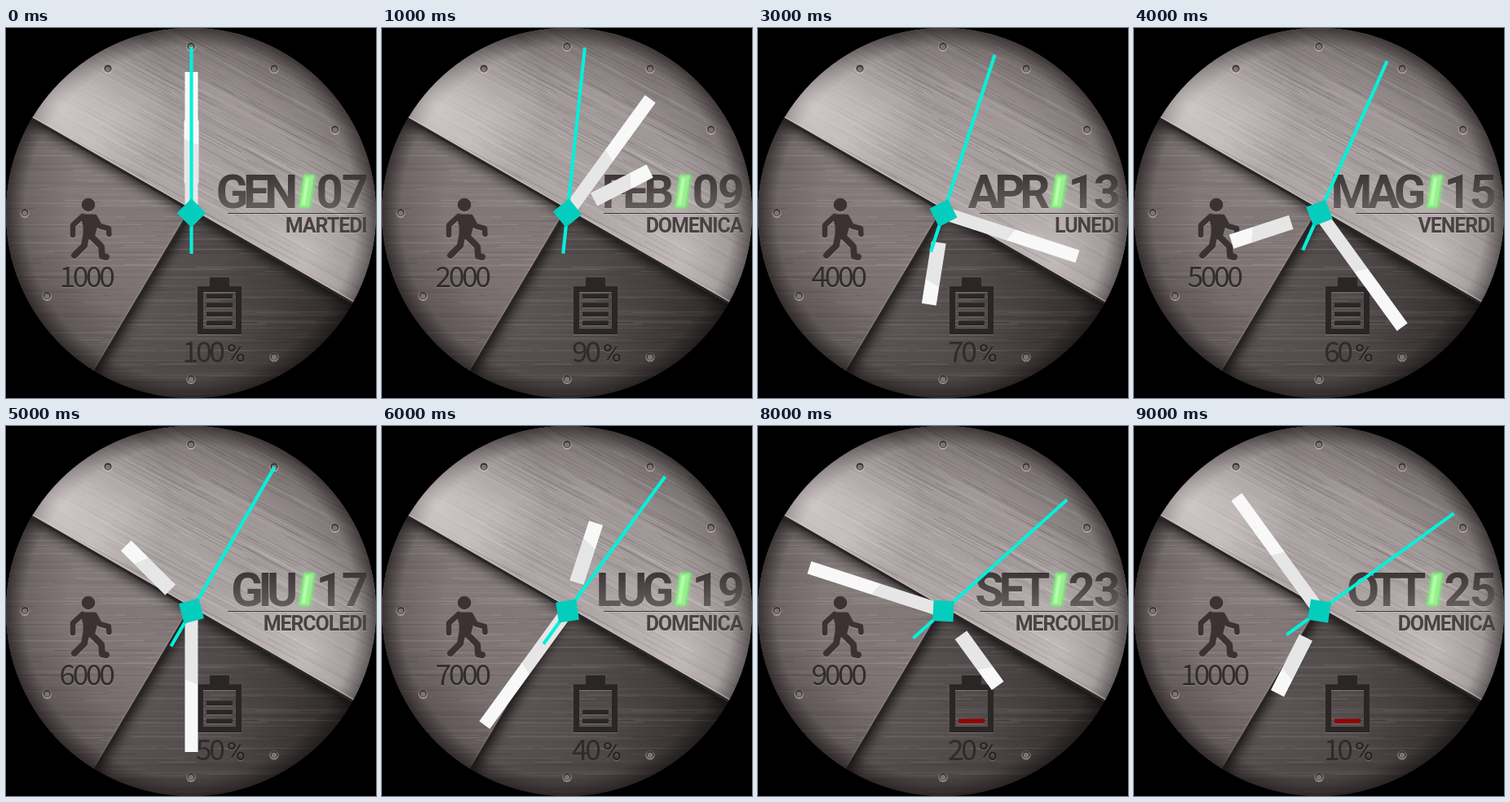
Recreate the animation shown at these times as an HTML page with a canvas. Size 454 by 454 pixels, loop 10000 ms.

```html
<!DOCTYPE html>
<html lang="it">
<head>
<meta charset="utf-8">
<title>Watch face</title>
<style>
  html, body { margin: 0; width: 100%; height: 100%; overflow: hidden; background: #000; }
  canvas, svg { position: absolute; left: 0; top: 0; width: 454px; height: 454px; }
  .date { font: 700 58px Roboto, "Liberation Sans", sans-serif; }
  .day { font: 700 25px Roboto, "Liberation Sans", sans-serif; letter-spacing: -1.1px; }
  .count { font: 300 35.5px "Noto Sans CJK JP", "Noto Sans CJK SC", "Open Sans", sans-serif; letter-spacing: -3.4px; }
  .percent { font: 500 32px Roboto, "Open Sans", sans-serif; }
  .engraved { filter: drop-shadow(0 1px .5px rgba(255, 255, 255, .2)); }
</style>
</head>
<body>
<canvas id="metal" width="454" height="454"></canvas>
<svg viewBox="0 0 454 454">
  <defs>
    <linearGradient id="ink" x1="0" y1="180" x2="0" y2="222" gradientUnits="userSpaceOnUse">
      <stop offset="0" stop-color="#3d3636"/><stop offset="1" stop-color="#665d5d"/>
    </linearGradient>
    <linearGradient id="sheen" x1="0" y1="-80" x2="5" y2="-92" gradientUnits="userSpaceOnUse">
      <stop offset=".48" stop-color="#e7e6e7"/><stop offset=".52" stop-color="#f8f8f8"/>
    </linearGradient>
    <filter id="glow" x="-60%" y="-30%" width="220%" height="160%"><feGaussianBlur stdDeviation="2"/></filter>
  </defs>

  <g class="engraved">
    <g class="date" fill="url(#ink)">
      <text id="month" y="221.3" text-anchor="end" x="352" letter-spacing="-6.3"/>
      <text id="date" y="221.3" text-anchor="end" x="443" letter-spacing="-2"/>
    </g>
    <path d="M272 227.5H438" stroke="#3e3636"/>
    <text id="day" class="day" x="442.5" y="251" text-anchor="end" fill="#4a4242"/>
  </g>
  <path d="M365 180H380L374 221H359Z" fill="#7cf27a" opacity=".75" filter="url(#glow)"/>
  <path d="M366 181H378L372 220H360Z" fill="#98f08f" stroke="#82e57e" stroke-width="1.5" stroke-linejoin="round"/>
  <path d="M370 184L365 217" stroke="#b5ffab" stroke-width="4"/>

  <g class="engraved" fill="#3b3333" stroke="#3b3333" stroke-linecap="round" stroke-linejoin="round">
    <circle cx="101" cy="217" r="8.3" stroke="none"/>
    <path d="M94 231H107L110 242L106 257H97L97 243Z" stroke-width="5"/>
    <path fill="none" stroke-width="6.5" d="M94 231L82 242L82 254M109 232L115 243L126 246L126.5 253"/>
    <path fill="none" stroke-width="8" d="M98 256L96 267L84 279M106 257L117 268L118 280L123 281"/>
  </g>
  <text id="steps" class="count engraved" x="98" y="318" text-anchor="middle" fill="#332c2c"/>

  <path d="M235 317H250V306H274V317H289V376H235ZM242 324V369H282V324Z" fill="#2b2626" fill-rule="evenodd" class="engraved"/>
  <g id="bars" class="engraved"></g>
  <text id="charge" class="count" x="265.5" y="410" text-anchor="end" fill="#302a2a"/>
  <text class="percent engraved" x="270.5" y="410" fill="#2b2525">%</text>

  <g transform="translate(227.5 227)">
    <path id="hour" d="M-9 -36.5H9V-113.5H-9Z" fill="url(#sheen)"/>
    <path id="minute" d="M-8 -10H8V-173H-8Z" fill="url(#sheen)"/>
    <g id="second">
      <path d="M0 50V-204" stroke="#05f0da" stroke-width="4.2"/>
      <path d="M0 -17.8L17.8 0L0 17.8L-17.8 0Z" fill="#05cdbd"/>
    </g>
  </g>
</svg>
<script>
const months = ['GEN', 'FEB', 'MAR', 'APR', 'MAG', 'GIU', 'LUG', 'AGO', 'SET', 'OTT'];
const days = ['MARTEDI', 'DOMENICA', 'MERCOLEDI', 'LUNEDI', 'VENERDI',
  'MERCOLEDI', 'DOMENICA', 'VENERDI', 'MERCOLEDI', 'DOMENICA'];
const byId = id => document.getElementById(id);

const ctx = byId('metal').getContext('2d');
const upperPlate = [[0, 0], [454, 0], [454, 354], [0, 93]];
let seed = 17;
function random() {
  seed = (seed * 16807) % 2147483647;
  return seed / 2147483647;
}

function trace(points) {
  ctx.beginPath();
  points.forEach(([x, y]) => ctx.lineTo(x, y));
}

function gradient(x1, y1, x2, y2, colors) {
  const g = ctx.createLinearGradient(x1, y1, x2, y2);
  colors.forEach((c, i) => g.addColorStop(i / (colors.length - 1), c));
  return g;
}

// A brushed plate casting a shadow on the plates beneath it
function plate(points, fill, degrees, strength) {
  ctx.save();
  trace(points);
  ctx.shadowColor = 'rgba(0,0,0,.85)';
  ctx.shadowBlur = 16;
  ctx.shadowOffsetX = 2;
  ctx.shadowOffsetY = 6;
  ctx.fillStyle = fill;
  ctx.fill();
  ctx.shadowColor = 'transparent';
  ctx.clip();
  ctx.translate(227, 227);
  ctx.rotate(degrees * Math.PI / 180);
  for (let i = 0; i < 1100; i++) {
    const tone = random() < .5 ? 255 : 20;
    ctx.fillStyle = `rgba(${tone},${tone},${tone},${random() * strength})`;
    ctx.fillRect(random() * 600 - 350, random() * 500 - 250, 30 + random() * 180, 1);
  }
  ctx.restore();
}

function line(x1, y1, x2, y2, color, width) {
  ctx.strokeStyle = color;
  ctx.lineWidth = width;
  trace([[x1, y1], [x2, y2]]);
  ctx.stroke();
}

function light(x, y, radius, rgb, alpha) {
  const g = ctx.createRadialGradient(x, y, 0, x, y, radius);
  g.addColorStop(0, `rgba(${rgb},${alpha})`);
  g.addColorStop(1, `rgba(${rgb},0)`);
  ctx.fillStyle = g;
  ctx.fillRect(0, 0, 454, 454);
}

function hole(degrees) {
  const a = degrees * Math.PI / 180;
  const x = 227 + 204 * Math.sin(a), y = 226.5 - 204 * Math.cos(a);
  const disc = (dy, r, color) => {
    ctx.fillStyle = color;
    ctx.beginPath();
    ctx.arc(x, y + dy, r, 0, 7);
    ctx.fill();
  };
  disc(.8, 5.6, 'rgba(215,205,205,.55)');
  disc(0, 4.6, '#39322f');
  disc(.8, 3.2, '#7d7373');
}

function drawMetal() {
  ctx.beginPath();
  ctx.arc(227, 227, 227, 0, 7);
  ctx.clip();
  plate([[0, 0], [454, 0], [454, 454], [0, 454]],
    gradient(120, 400, 430, 330, ['#625a5a', '#524b4b', '#332e2e']), 0, .12);
  plate([[0, 80], [225, 226], [98, 440], [0, 454]],
    gradient(190, 190, 60, 390, ['#857b7b', '#7e7474', '#6b6161']), 0, .14);
  line(219, 236, 98, 440, '#292424', 3);
  line(216, 236, 95, 440, 'rgba(190,180,180,.3)', 1);
  plate(upperPlate, gradient(320, 0, 190, 210, ['#857b7b', '#a39a9a', '#b0a7a7']), 28, .17);

  const edge = ctx.createRadialGradient(227, 227, 150, 227, 227, 227);
  edge.addColorStop(0, 'rgba(20,15,15,0)');
  edge.addColorStop(.7, 'rgba(20,15,15,.16)');
  edge.addColorStop(1, 'rgba(20,15,15,.65)');
  ctx.fillStyle = edge;
  ctx.fillRect(0, 0, 454, 454);

  ctx.save();
  trace(upperPlate);
  ctx.clip();
  light(370, 285, 130, '225,217,217', .4);
  light(65, 95, 135, '240,232,232', .65);
  ctx.restore();

  line(0, 93, 454, 354, '#2a2525', 3.5);
  line(0, 90.5, 454, 351.5, 'rgba(218,210,210,.6)', 1.4);
  [0, 30, 60, 150, 180, 240, 270, 330].forEach(hole);
}

const spin = (id, degrees) => byId(id).setAttribute('transform', `rotate(${degrees})`);

function show(step) {
  const charge = 100 - step * 10;
  const count = Math.min(4, Math.ceil(charge / 20));
  const color = charge > 20 ? '#2b2626' : '#8e0505';
  spin('second', step * 6);
  spin('minute', step * 36);
  spin('hour', step * 63);
  byId('month').textContent = months[step];
  byId('date').textContent = String(7 + step * 2).padStart(2, '0');
  byId('day').textContent = days[step];
  byId('steps').textContent = (step + 1) * 1000;
  byId('charge').textContent = charge;
  byId('bars').innerHTML = Array.from({ length: count }, (_, i) =>
    `<rect x="246" y="${359.3 - i * 11}" width="32" height="5.7" fill="${color}"/>`).join('');
}

let shown = -1;
function tick() {
  const step = Math.floor(performance.now() / 1000) % 10;
  if (step !== shown) show(shown = step);
  requestAnimationFrame(tick);
}

drawMetal();
tick();
</script>
</body>
</html>
```
